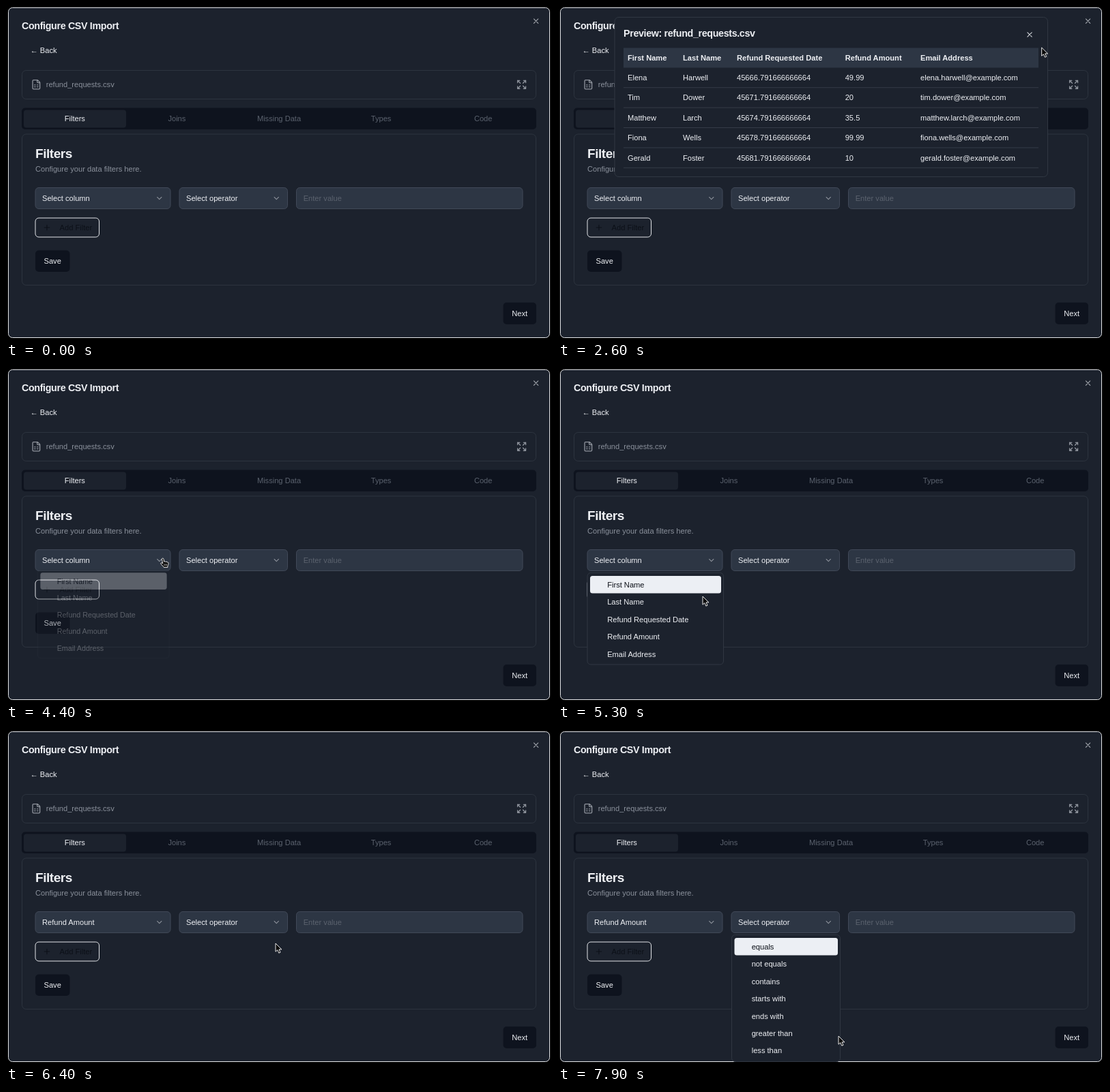
Write an HTML page that moves like this. It is 800 by 490 pixels and loops after 8000 ms.

```html
<!DOCTYPE html>
<html lang="en">
<head>
<meta charset="utf-8">
<title>Configure CSV Import</title>
<style>
  html, body { margin: 0; width: 100%; height: 100%; overflow: hidden; background: #000; }
  svg { display: block; }
  text { font: 11.12px "Liberation Sans", Arial, sans-serif; fill: #eef0f4; }
  .bold { font-weight: bold; }
  .title { font-size: 14.3px; font-weight: bold; letter-spacing: -.025em; }
  .heading { font-size: 19.06px; font-weight: bold; letter-spacing: -.025em; }
  .muted { fill: #8a909b; }
  .faint { fill: #5b626e; }
  .dark { fill: #0c1018; }
  .mid { text-anchor: middle; }
  .icon { fill: none; stroke: #8f949d; stroke-width: 2; stroke-linecap: round; stroke-linejoin: round; }
</style>
</head>
<body>
<svg id="stage" width="800" height="490" viewBox="0 0 800 490"></svg>
<script>
const BG = '#1c222d', DEEP = '#0e131e', FIELD = '#2d3644', LINE = '#2d343f', LIGHT = '#eceff4';
const LOOP = 8000, STEP = 100;

const box = (x, y, w, h, fill, stroke = 'none', r = 5) =>
  `<rect x="${x}" y="${y}" width="${w}" height="${h}" rx="${r}" fill="${fill}" stroke="${stroke}"/>`;
const label = (x, y, str, cls = '', id = '') => `<text x="${x}" y="${y}" class="${cls}" id="${id}">${str}</text>`;
const icon = (x, y, size, d, id = '', stroke = '') =>
  `<path class="icon" id="${id}" d="${d}" transform="translate(${x} ${y}) scale(${size / 24})" style="stroke:${stroke}"/>`;

const CROSS = 'M18 6 6 18M6 6l12 12';
const CHEVRON = 'm6 9 6 6 6-6';
const PLUS = 'M5 12h14M12 5v14';
const SHEET = 'M15 2H6a2 2 0 0 0-2 2v16a2 2 0 0 0 2 2h12a2 2 0 0 0 2-2V7ZM14 2v4a2 2 0 0 0 2 2h4M8 13h2M14 13h2M8 17h2M14 17h2';
const EXPAND = 'm21 21-6-6m6 6v-4.8m0 4.8h-4.8M3 16.2V21m0 0h4.8M3 21l6-6M21 7.8V3m0 0h-4.8M21 3l-6 6M3 7.8V3m0 0h4.8M3 3l6 6';

const select = (x, w, str, id) =>
  box(x, 266.5, w, 31, FIELD, '#414958') + label(x + 10, 286, str, '', id) +
  icon(x + w - 22.6, 275.7, 12.7, CHEVRON);

function page() {
  const tabs = ['Filters', 'Joins', 'Missing Data', 'Types', 'Code'];
  return box(3.5, 2.5, 793, 484, BG, '#e2e4e8', 6) +
    label(23, 34, 'Configure CSV Import', 'title') +
    icon(770.2, 15.8, 12.7, CROSS, '', '#a6aab1') +
    label(35.6, 69, '← Back') +
    box(23.5, 94.5, 753, 42, 'none', LINE, 6) +
    icon(36.4, 107.3, 15.9, SHEET) +
    label(58.7, 119, 'refund_requests.csv', 'muted') +
    icon(747.6, 107.3, 15.9, EXPAND, 'expand') +
    box(23, 149.5, 754, 31.5, DEEP) +
    box(26, 152.5, 150, 26, BG, 'none', 4) +
    tabs.map((s, i) => label(100.8 + 149.6 * i, 169, s, i ? 'mid faint' : 'mid')).join('') +
    box(23.5, 188, 753, 221.5, 'none', LINE, 6) +
    label(43, 223, 'Filters', 'heading') +
    label(43, 243, 'Configure your data filters here.', 'muted') +
    select(43, 198, 'Select column', 'column') +
    select(254, 158.5, 'Select operator') +
    box(425.5, 266.5, 331.5, 31, FIELD, '#414958') +
    label(435.7, 286, 'Enter value', 'faint') +
    box(43, 311, 93.5, 28, 'none', '#e2e4e8') +
    icon(53.6, 318.6, 12.7, PLUS, '', '#0c1018') +
    label(78.6, 329, 'Add Filter', 'dark') +
    box(43, 358.5, 50.5, 31.5, DEEP) + label(68.2, 378, 'Save', 'mid') +
    box(728.5, 435, 48.5, 32, DEEP) + label(752.7, 455, 'Next', 'mid');
}

function preview() {
  const cols = [102, 183, 262, 420.7, 531];
  const head = ['First Name', 'Last Name', 'Refund Requested Date', 'Refund Amount', 'Email Address'];
  const people = [
    ['Elena', 'Harwell', 66, '49.99'], ['Tim', 'Dower', 71, '20'], ['Matthew', 'Larch', 74, '35.5'],
    ['Fiona', 'Wells', 78, '99.99'], ['Gerald', 'Foster', 81, '10']
  ];
  const row = ([first, last, day, amount], i) => {
    const y = 109 + 29.4 * i;
    const mail = `${first}.${last}@example.com`.toLowerCase();
    return [first, last, `456${day}.791666666664`, amount, mail].map((s, c) => label(cols[c], y, s)).join('') +
      `<path d="M96 ${y + 10.7}h608" stroke="#343b47"/>`;
  };
  return '<g id="preview">' + box(83, 16.5, 634.5, 234, BG, '#303742', 6) +
    label(96, 45, 'Preview: refund_requests.csv', 'title') +
    `<g id="closeHover">${box(676, 29, 30, 27, LIGHT)}</g>` +
    icon(684.7, 35.7, 12.7, CROSS, 'close', '#d9dce1') +
    box(96, 61.5, 608, 29, FIELD, 'none', 0) +
    head.map((s, c) => label(cols[c], 80, s, 'bold')).join('') +
    people.map(row).join('') + '</g>';
}

const menu = (id, x, w, h, items) =>
  `<g id="${id}">` + box(x, 300.5, w, h, BG, '#303742') +
  `<g class="mark">${box(x + 4, 305, w - 7.5, 25.5, LIGHT, 'none', 3.5)}</g>` +
  items.map((s, i) => label(x + 29.2, 322 + 25.4 * i, s, 'item')).join('') + '</g>';

const cursors =
  `<g id="arrow"><path d="M0 0V12.2L2.8 9.7 4.8 14.2 7 13.2 5 8.9H8.9Z" fill="#0a0a0a" stroke="#fff" stroke-width=".9" stroke-linejoin="round"/></g>` +
  `<g id="hand"><path d="M-1.6 1.4C-1.6-.2 .8-.3 1 1.3L1.7 5.2C2.6 4.5 3.6 4.7 4 5.5 5 4.9 5.9 5.2 6.1 6 7.3 5.6 8 6.3 8 7.3 8 9.5 7.6 10.3 6.9 11.5V13.4H1.2C.6 12-1.6 10.3-2.8 8.6-3.9 7.1-2.4 6.2-1.2 7.2L-.3 7.9Z" fill="#0a0a0a" stroke="#fff" stroke-width=".9" stroke-linejoin="round"/>` +
  `<path d="M1.9 8.4v2.8M3.7 8.4v2.8M5.5 8.4v2.8" stroke="#fff" stroke-width=".6"/></g>`;

const $ = id => document.getElementById(id);
$('stage').innerHTML = page() + preview() +
  menu('columns', 43, 199.5, 134.5, ['First Name', 'Last Name', 'Refund Requested Date', 'Refund Amount', 'Email Address']) +
  menu('operators', 254.5, 159, 186, ['equals', 'not equals', 'contains', 'starts with', 'ends with', 'greater than', 'less than']) +
  cursors;

// Pointer tip: time, x, y
const path = [
  [500, 793, 110], [600, 779, 111], [700, 766, 112], [1000, 755, 112],
  [2100, 755, 112], [2200, 752, 109], [2500, 718, 72], [2800, 690, 39],
  [3300, 690, 39], [3400, 678, 47], [3700, 430, 180], [4000, 240, 272], [4100, 230, 279],
  [5100, 230, 279], [5200, 225, 301], [5300, 212, 335], [5500, 184, 380], [5700, 170, 391],
  [5900, 170, 391], [6000, 184, 388], [6200, 310, 348], [6400, 395, 313], [6600, 407, 292], [6800, 408, 279],
  [7200, 408, 280], [7400, 436, 318], [7500, 452, 356], [7600, 455, 395], [7700, 444, 427],
  [7800, 426, 444], [7900, 411, 449]
];
const handTimes = [[700, 2300], [2700, 3200], [4100, 5200], [6700, 7300]];

const within = (t, a, b) => t >= a && t < b;
const show = (el, on) => { el.style.display = on ? '' : 'none'; };

function pointAt(t) {
  const i = path.findIndex(k => k[0] >= t);
  if (i < 1) return path[0].slice(1);
  const [t0, x0, y0] = path[i - 1], [t1, x1, y1] = path[i];
  const p = (t - t0) / (t1 - t0);
  return [x0 + (x1 - x0) * p, y0 + (y1 - y0) * p];
}

// Fade, zoom from 95% and slide down while opening
function drawMenu(id, t, from, to, cx, active) {
  const el = $(id), p = [0.3, 0.985][(t - from) / STEP] ?? 1, s = 0.95 + 0.05 * p;
  show(el, within(t, from, to));
  el.setAttribute('opacity', p);
  el.setAttribute('transform', `translate(${cx} ${300 - 6.36 * (1 - p)}) scale(${s}) translate(${-cx} -300)`);
  el.querySelector('.mark').setAttribute('transform', `translate(0 ${25.4 * active})`);
  el.querySelectorAll('.item').forEach((n, i) => n.classList.toggle('dark', i === active));
}

function draw(t) {
  const closing = within(t, 2700, 3100);
  show($('preview'), within(t, 1400, 3100));
  show($('closeHover'), closing);
  $('close').style.stroke = closing ? '#111722' : '#d9dce1';
  $('expand').style.stroke = within(t, 700, 2400) ? '#fff' : '#8f949d';
  $('column').textContent = t < 6000 ? 'Select column' : 'Refund Amount';

  drawMenu('columns', t, 4400, 6000, 142.75, t < 5400 ? 0 : t < 5500 ? 2 : 3);
  drawMenu('operators', t, 7000, LOOP, 334, 0);

  const hand = handTimes.some(([a, b]) => within(t, a, b));
  const [x, y] = pointAt(t);
  for (const id of ['arrow', 'hand']) {
    show($(id), t >= 500 && hand === (id === 'hand'));
    $(id).setAttribute('transform', `translate(${x} ${y})`);
  }
}

const start = performance.now();
function tick() {
  const t = (performance.now() - start) % LOOP;
  draw(Math.floor(t / STEP) * STEP);
  requestAnimationFrame(tick);
}
tick();
</script>
</body>
</html>
```
